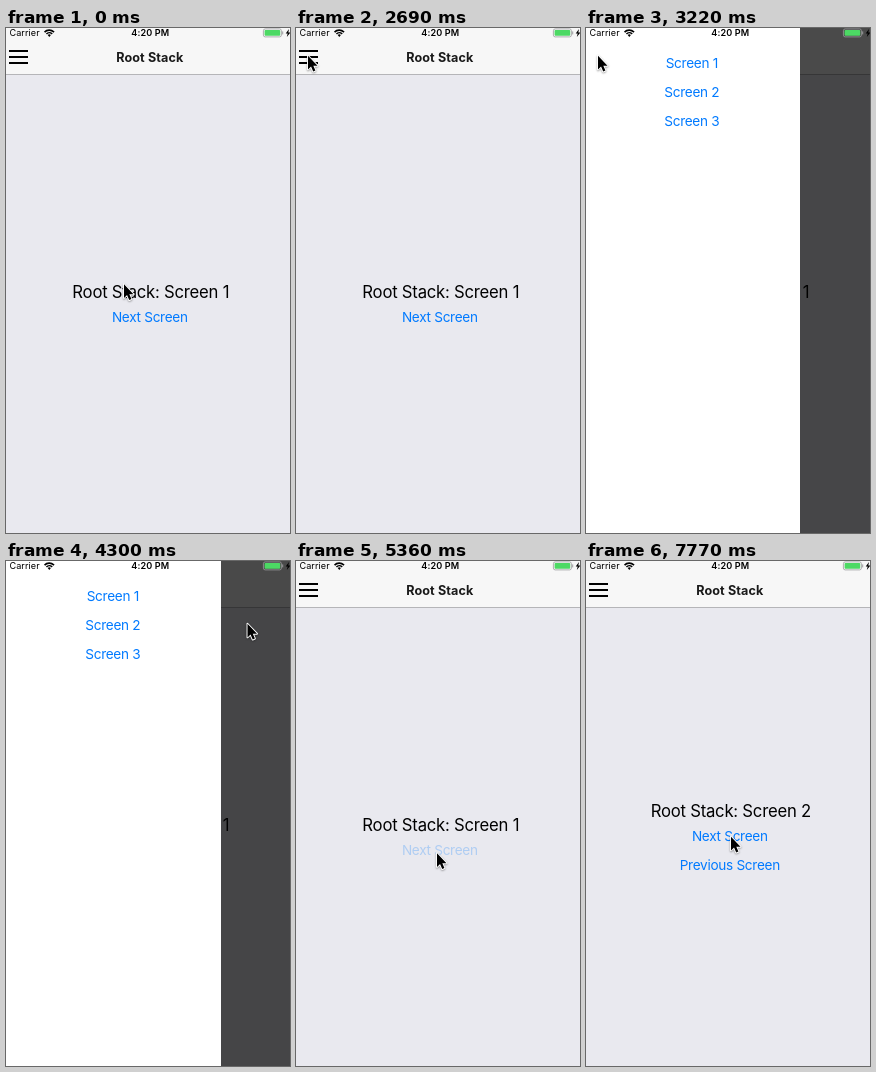
Recreate the animation shown at these times as an HTML page with a canvas. Size 284x505 px, loop 8 s.

```html
<!DOCTYPE html>
<html lang="en">
<head>
<meta charset="utf-8">
<title>Drawer and stack navigation</title>
<style>
  html, body { margin: 0; width: 100%; height: 100%; overflow: hidden; background: #fff; }
  canvas { display: block; width: 284px; height: 505px; }
</style>
</head>
<body>
<canvas id="stage" width="284" height="505"></canvas>
<script>
const W = 284, H = 505, LOOP = 8000;
const BEAT = 267.5; // the picture is refreshed once per beat
const HEADER_H = 47, DRAWER_W = 215, MAX_DIM = 0.7, ROW = 29;
const BODY = '#e9e9ef', BLUE = '#007aff';
const PRESS_BEAT = 20;
const ctx = document.getElementById('stage').getContext('2d');

// Ease-out progress from 0 to 1, starting at `start` and lasting `length` beats.
function easeOut(beat, start, length, power = 3) {
  const u = Math.min(1, Math.max(0, (beat - start) / length));
  return 1 - (1 - u) ** power;
}

// The pointer rests between glides.
const restPoint = { x: 116.5, y: 254.5 };
const glides = [
  { start: 0, length: 2, x: 123, y: 228 },
  { start: 5, length: 1, x: 122, y: 248 },
  { start: 6, length: 1, x: 45, y: 36 },
  { start: 8, length: 1, x: 21, y: 9 },
  { start: 9, length: 1, x: 10.5, y: 26 },
  { start: 13, length: 1, x: 166, y: 27 },
  { start: 14, length: 1, x: 240, y: 61 },
  { start: 16, length: 1, x: 237, y: 72 },
  { start: 17, length: 2, x: 139.5, y: 290.5 },
  { start: 23, length: 2, x: 136, y: 302 },
  { start: 27, length: 2, x: 143.5, y: 274 }
];

function cursorAt(beat) {
  return glides.reduce((from, glide) => {
    const p = easeOut(beat, glide.start, glide.length, 2);
    return { x: from.x + (glide.x - from.x) * p, y: from.y + (glide.y - from.y) * p };
  }, restPoint);
}

const drawerWidthAt = beat =>
  Math.round(DRAWER_W * (easeOut(beat, 10.34, 2) - easeOut(beat, 16, 1.67)));

const pushAt = beat => easeOut(beat, PRESS_BEAT, 1.64);

function textStyle(weight, size, spacing, color) {
  return { font: `${weight} ${size}px Inter, "Open Sans", sans-serif`, spacing: spacing + 'px', color };
}

const styles = {
  heading: textStyle(400, 16.7, -0.23, '#000'),
  button: textStyle(400, 13.6, -0.3, BLUE),
  title: textStyle(700, 12.6, 0.1, 'rgba(0,0,0,.9)'),
  carrier: textStyle(400, 9.1, 0.05, '#000'),
  clock: textStyle(600, 9.1, 0.1, '#000')
};

function label(text, x, y, style, align = 'center') {
  ctx.font = style.font;
  ctx.letterSpacing = style.spacing;
  ctx.fillStyle = style.color;
  ctx.textAlign = align;
  ctx.fillText(text, x, y);
}

function withAlpha(alpha, draw) {
  ctx.save();
  ctx.globalAlpha *= alpha;
  draw();
  ctx.restore();
}

function polygon(points) {
  ctx.beginPath();
  points.forEach(([x, y]) => ctx.lineTo(x, y));
  ctx.closePath();
}

function roundBox(x, y, width, height, radius) {
  ctx.beginPath();
  ctx.roundRect(x, y, width, height, radius);
}

function screenText(number, x, y, buttons) {
  label('Root Stack: Screen ' + number, x + 144.8, y, styles.heading);
  buttons.forEach((text, i) => label(text, x + 143.8, y + 24 + ROW * i, styles.button));
}

function firstScreen(x, pressed) {
  screenText(1, x, 270.3, pressed ? [] : ['Next Screen']);
  if (pressed) withAlpha(0.25, () => label('Next Screen', x + 143.8, 294.3, styles.button));
}

function secondScreen(x) {
  ctx.save();
  ctx.shadowColor = 'rgba(0,0,0,.2)';
  ctx.shadowBlur = x > 0 ? 8 : 0;
  ctx.fillStyle = BODY;
  ctx.fillRect(x, HEADER_H, W, H - HEADER_H);
  ctx.restore();
  screenText(2, x, 256, ['Next Screen', 'Previous Screen']);
}

function drawBody(push, pressed) {
  ctx.save();
  ctx.beginPath();
  ctx.rect(0, HEADER_H, W, H - HEADER_H);
  ctx.clip();
  ctx.fillStyle = BODY;
  ctx.fillRect(0, 0, W, H);
  withAlpha(1 - 0.15 * push, () => firstScreen(-0.3 * W * push, pressed));
  if (push > 0) secondScreen(W * (1 - push));
  ctx.restore();
}

function drawHeader(push) {
  const remaining = push > 0 ? 1 - push : 0;
  ctx.fillStyle = '#f7f7f7';
  ctx.fillRect(0, 0, W, HEADER_H);
  ctx.fillStyle = '#b5b5b8';
  ctx.fillRect(0, HEADER_H - 1, W, 1);
  withAlpha(1 - remaining, () => {
    label('Root Stack', 143.8 + 200 * remaining, 33.6, styles.title);
    ctx.fillStyle = '#000';
    for (let i = 0; i < 3; i++) ctx.fillRect(3, 22 + 6 * i, 19, 2);
  });
}

function drawDrawer(width) {
  if (!width) return;
  ctx.fillStyle = `rgba(0,0,0,${MAX_DIM * width / DRAWER_W})`;
  ctx.fillRect(0, 0, W, H);
  ctx.fillStyle = '#fff';
  ctx.fillRect(0, 0, width, H);
  const center = width - DRAWER_W / 2 - 0.7;
  for (let i = 0; i < 3; i++) label('Screen ' + (i + 1), center, 40 + ROW * i, styles.button);
}

function drawWifi(x, y) {
  const from = -Math.PI * 0.76, to = -Math.PI * 0.24;
  ctx.strokeStyle = ctx.fillStyle = '#000';
  ctx.lineWidth = 1.6;
  for (const radius of [3.9, 6.5]) {
    ctx.beginPath();
    ctx.arc(x, y, radius, from, to);
    ctx.stroke();
  }
  ctx.beginPath();
  ctx.moveTo(x, y + 0.4);
  ctx.arc(x, y, 2.2, from, to);
  ctx.fill();
}

function drawBattery() {
  ctx.strokeStyle = ctx.fillStyle = '#9b9b9d';
  ctx.lineWidth = 0.8;
  roundBox(257.4, 0.9, 18, 8, 1.8);
  ctx.stroke();
  ctx.fillRect(276.2, 3.4, 1, 3);
  ctx.fillStyle = '#4cd964';
  roundBox(258.6, 2, 15.6, 5.8, 0.8);
  ctx.fill();
  ctx.fillStyle = '#000';
  polygon([[283, 1], [279.7, 5.4], [281.7, 5.4], [280.8, 9], [284.4, 4.4], [282.3, 4.4]]);
  ctx.fill();
}

function drawStatusBar() {
  label('Carrier', 3.5, 8.3, styles.carrier, 'left');
  label('4:20 PM', 144.3, 8.3, styles.clock);
  drawWifi(43.3, 8.6);
  drawBattery();
}

function drawCursor({ x, y }) {
  ctx.save();
  ctx.translate(x + 1.5, y + 1.8);
  ctx.scale(0.95, 0.95);
  polygon([[0, 0], [0, 14.3], [3.2, 11.3], [5.5, 16.6], [7.8, 15.6], [5.6, 10.4], [10, 10.4]]);
  ctx.lineJoin = 'round';
  ctx.lineWidth = 2;
  ctx.strokeStyle = '#fff';
  ctx.shadowColor = 'rgba(0,0,0,.4)';
  ctx.shadowBlur = 2;
  ctx.shadowOffsetY = 0.8;
  ctx.stroke();
  ctx.shadowColor = 'transparent';
  ctx.fillStyle = '#000';
  ctx.fill();
  ctx.restore();
}

function render(now) {
  const beat = Math.floor((now % LOOP) / BEAT);
  const push = pushAt(beat);
  drawBody(push, beat === PRESS_BEAT);
  drawHeader(push);
  drawDrawer(drawerWidthAt(beat));
  drawStatusBar();
  drawCursor(cursorAt(beat));
}

const start = performance.now();
function tick() {
  render(performance.now() - start);
  requestAnimationFrame(tick);
}
tick();
</script>
</body>
</html>
```
